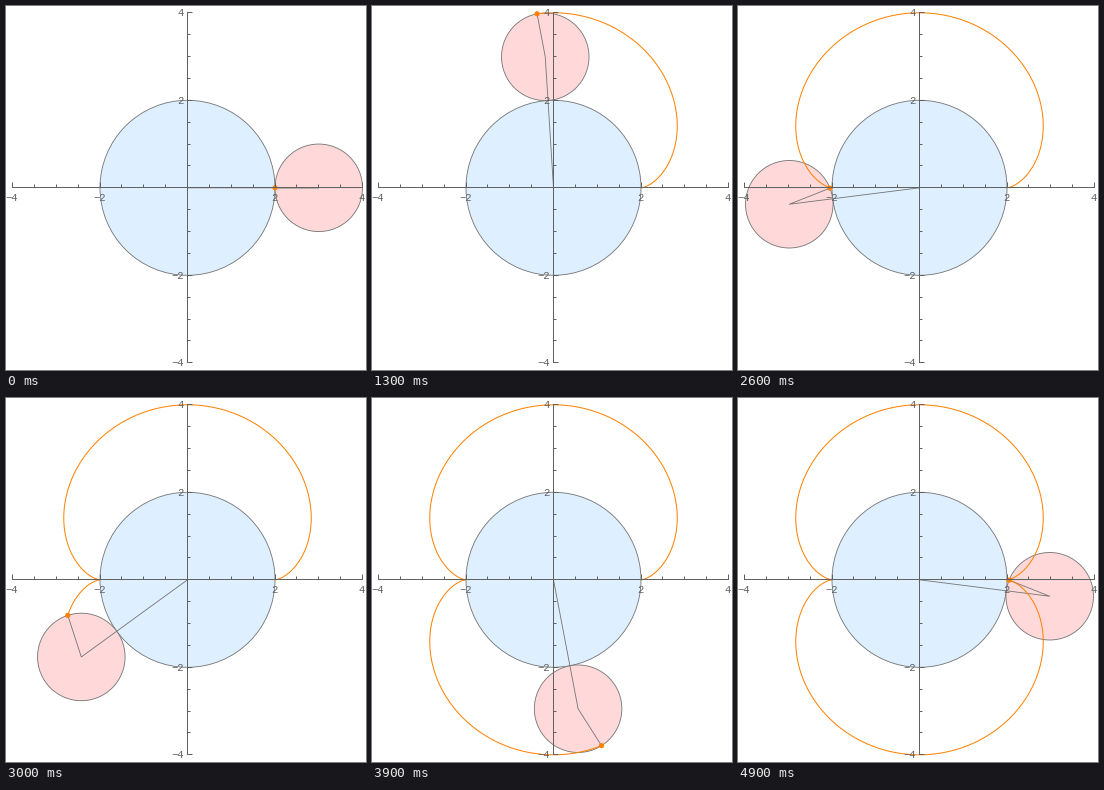
Animation, 360 px wide and 364 px high, one loop 5 s. Source, as a matplotlib script:

```python
import numpy as np
import matplotlib.pyplot as plt
from matplotlib.animation import FuncAnimation
from matplotlib.patches import Circle

WIDTH, HEIGHT, DPI = 360, 364, 100
FRAMES, INTERVAL = 50, 100
CX, CY, UNIT = 181.5, 181.8, 43.75
PX = 72 / DPI
GRAY, AXIS, ORANGE = "#757575", "#616161", "#ff8000"

plt.rcParams["toolbar"] = "None"
fig = plt.figure(figsize=(WIDTH / DPI, HEIGHT / DPI), dpi=DPI, facecolor="white")
ax = fig.add_axes([0, 0, 1, 1])
ax.set_xlim(0, WIDTH)
ax.set_ylim(HEIGHT, 0)
ax.axis("off")


def to_px(x, y):
    return CX + UNIT * x, CY - UNIT * y


def crisp(value):
    """Center of the pixel that holds the value."""
    return np.floor(value) + 0.5


def center(t):
    return 3 * np.cos(t), 3 * np.sin(t)


def nephroid(t):
    return 3 * np.cos(t) - np.cos(3 * t), 3 * np.sin(t) - np.sin(3 * t)


def disc(radius, fill, z):
    patch = Circle((CX, CY), radius * UNIT, fc=fill, ec=GRAY,
                   lw=0.85 * PX, zorder=z)
    return ax.add_patch(patch)


def stroke(x, y, color, z, width=1):
    line, = ax.plot(x, y, color=color, lw=width * PX, zorder=z,
                    solid_capstyle="butt", snap=False)
    return line


def label(x, y, value, align):
    text = f"{value:.0f}".replace("-", "\u2212")
    ax.text(x, y, text, family="Liberation Mono", size=10.5 * PX, color=AXIS,
            ha=align, va="center_baseline", zorder=7)


def draw_axes():
    x0, y0 = crisp(CX), crisp(CY)
    reach = np.array([-1, 1]) * (4 * UNIT + 0.5)
    stroke(x0 + reach, [y0, y0], AXIS, 6)
    stroke([x0, x0], y0 + reach, AXIS, 6)
    for value in np.arange(-4, 4.1, 0.5):
        if value == 0:
            continue
        major = value % 2 == 0
        size = 5 if major else 3
        x, y = map(crisp, to_px(value, value))
        stroke([x, x], [y0, y0 - size], AXIS, 6)
        stroke([x0, x0 + size], [y, y], AXIS, 6)
        if major:
            label(x - 1, 191, value, "center")
            label(178, y - 0.5, value, "right")


disc(2, "#deefff", 1)
roller = disc(1, "#ffd9d9", 2)
arms = stroke([], [], GRAY, 3, 0.85)
trace = stroke([], [], ORANGE, 4)
dot = ax.add_patch(Circle((0, 0), 2.6, fc=ORANGE, ec="none", zorder=5))
draw_axes()


def update(frame):
    t = 2 * np.pi * frame / FRAMES
    hub, tip = to_px(*center(t)), to_px(*nephroid(t))
    roller.center = hub
    dot.center = tip
    arms.set_data([CX, hub[0], tip[0]], [CY, hub[1], tip[1]])
    trace.set_data(*to_px(*nephroid(np.linspace(0, t, 6 * frame + 2))))
    return roller, arms, trace, dot


anim = FuncAnimation(fig, update, frames=FRAMES, interval=INTERVAL,
                     repeat=True, repeat_delay=0)
plt.show()
```
